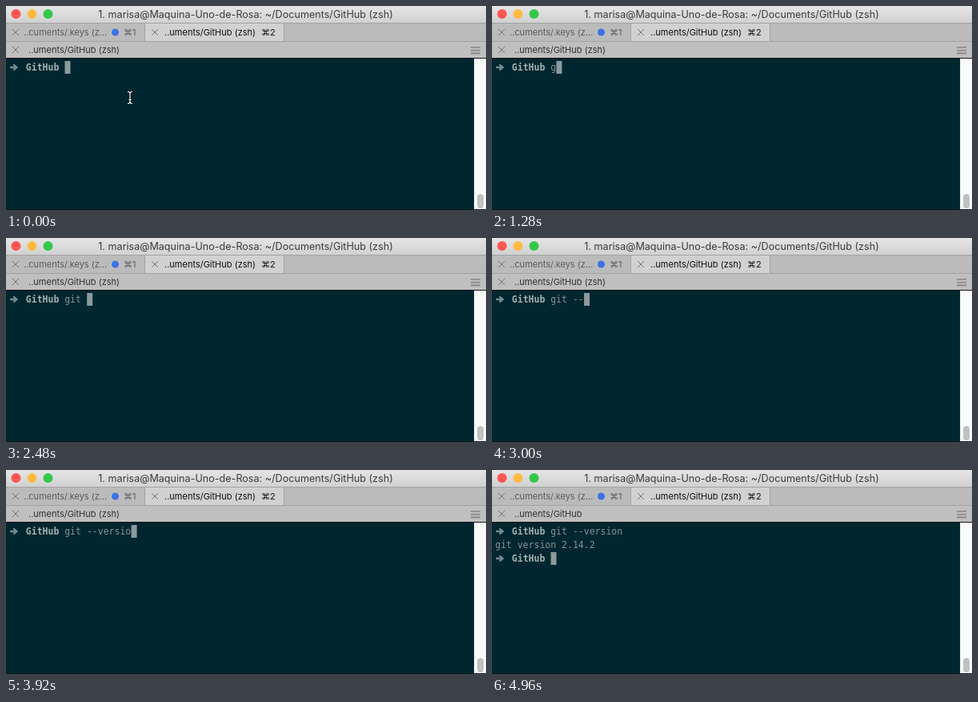
An HTML page that plays this animation: 600x256 px, repeating every 5 s.

```html
<!DOCTYPE html>
<html lang="en">
<head>
<meta charset="utf-8">
<title>Terminal</title>
<style>
html, body { margin: 0; width: 100%; height: 100%; overflow: hidden; background: #00262f; }
svg { display: block; width: 600px; height: 256px; }
text { white-space: pre; }
.ui { font-family: Inter, Roboto, sans-serif; font-size: 11px; fill: #303030; }
.title { font-size: 12.6px; fill: #3c3c3c; text-anchor: middle; }
.dim { fill: #5c5c5c; }
.front { fill: #111; }
.term { font-family: "DejaVu Sans Mono", "Liberation Mono", monospace; font-size: 11.5px; fill: #839496; }
.dir { font-weight: bold; fill: #a3b1b1; }
.close { stroke: #747474; stroke-width: 1; fill: none; }
.menu { stroke: #858585; stroke-width: 1.6; fill: none; }
</style>
</head>
<body>
<svg viewBox="0 0 600 256">
  <defs>
    <linearGradient id="bar" x2="0" y2="1">
      <stop offset="0" stop-color="#e6e5e6"/>
      <stop offset="1" stop-color="#d1d0d1"/>
    </linearGradient>
    <path id="x" class="close" d="M-4-4L4 4M4-4L-4 4"/>
    <path id="arrow" fill="#768a8e" d="M5 75.8H10L8.6 72.9H10.6L15.2 77L10.6 81.1H8.6L10 78.2H5Z"/>
    <path id="beam" d="M-3-7.5Q0-7.5 0-5V5Q0 7.5-3 7.5M3-7.5Q0-7.5 0-5M0 5Q0 7.5 3 7.5M-1.5 2.5H1.5"/>
  </defs>

  <rect width="600" height="22" fill="url(#bar)"/>
  <circle cx="12.5" cy="10" r="6" fill="#fc5650"/>
  <circle cx="32.5" cy="10" r="6" fill="#fdbc40"/>
  <circle cx="52.5" cy="10" r="6" fill="#34c84a"/>
  <text class="ui title" x="299.5" y="14.6">1. marisa@Maquina-Uno-de-Rosa: ~/Documents/GitHub (zsh)</text>

  <rect y="21" width="600" height="24" fill="#bcbbbc"/>
  <rect x="173" y="21" width="175" height="24" fill="#d2d1d2"/>
  <path d="M0 21.5H600M0 44.5H600M173.5 21V45M347.5 21V45" stroke="#a3a2a3"/>
  <use href="#x" x="12" y="33"/>
  <text class="ui dim" x="22" y="37">..cuments/.keys (z…</text>
  <circle cx="136.5" cy="33" r="4.5" fill="#3d72e4"/>
  <text class="ui dim" x="147" y="37">⌘1</text>
  <use href="#x" x="186" y="33"/>
  <text class="ui front" x="198" y="37">..uments/GitHub (zsh)</text>
  <text class="ui front" x="319" y="37">⌘2</text>

  <rect y="45" width="600" height="20" fill="#c0bfc0"/>
  <use href="#x" x="12" y="55"/>
  <text class="ui" id="pane" x="28" y="59"></text>
  <path class="menu" d="M581 52H593M581 55.7H593M581 59.4H593"/>

  <rect y="65" width="600" height="191" fill="#00262f"/>
  <rect y="65" width="600" height="1" fill="#111"/>
  <rect x="585" y="66" width="15" height="189" fill="#fafafa"/>
  <rect x="585" y="66" width="1" height="189" fill="#e4e4e4"/>
  <rect x="589" y="236" width="8" height="18" rx="4" fill="#c1c1c1"/>
  <rect y="255" width="600" height="1" fill="#06161b"/>

  <use href="#arrow"/>
  <text class="term dir" x="24.8" y="81">GitHub</text>
  <text class="term" id="cmd" x="73.2" y="81"></text>
  <g id="reply">
    <text class="term" x="4" y="98">git version 2.14.2</text>
    <use href="#arrow" y="34"/>
    <text class="term dir" x="24.8" y="115">GitHub</text>
  </g>
  <rect id="caret" width="7" height="16" fill="#8c9b9c"/>
  <g id="mouse" transform="translate(155 115)" fill="none">
    <use href="#beam" stroke="#071a20" stroke-width="3"/>
    <use href="#beam" stroke="#fff" stroke-width="1.2"/>
  </g>
</svg>
<script>
const LOOP = 5000, ENTER = 4760, ADVANCE = 6.923;
const command = "git --version";
const keys = [1240, 1420, 1600, 2000, 2640, 2800, 3040, 3200, 3360, 3600, 3760, 3920, 4120];
const get = id => document.getElementById(id);
const [pane, cmd, reply, caret, mouse] = ["pane", "cmd", "reply", "caret", "mouse"].map(get);
const show = (el, on) => el.setAttribute("visibility", on ? "visible" : "hidden");

function draw(t) {
  const typed = keys.filter(k => t >= k).length;
  const done = t >= ENTER;
  cmd.textContent = command.slice(0, typed);
  pane.textContent = "..uments/GitHub" + (done ? "" : " (zsh)");
  caret.setAttribute("x", 73.5 + (done ? 0 : typed * ADVANCE));
  caret.setAttribute("y", done ? 103 : 69);
  show(reply, done);
  show(mouse, typed === 0);
}

function tick() {
  draw(performance.now() % LOOP);
  requestAnimationFrame(tick);
}
tick();
</script>
</body>
</html>
```
